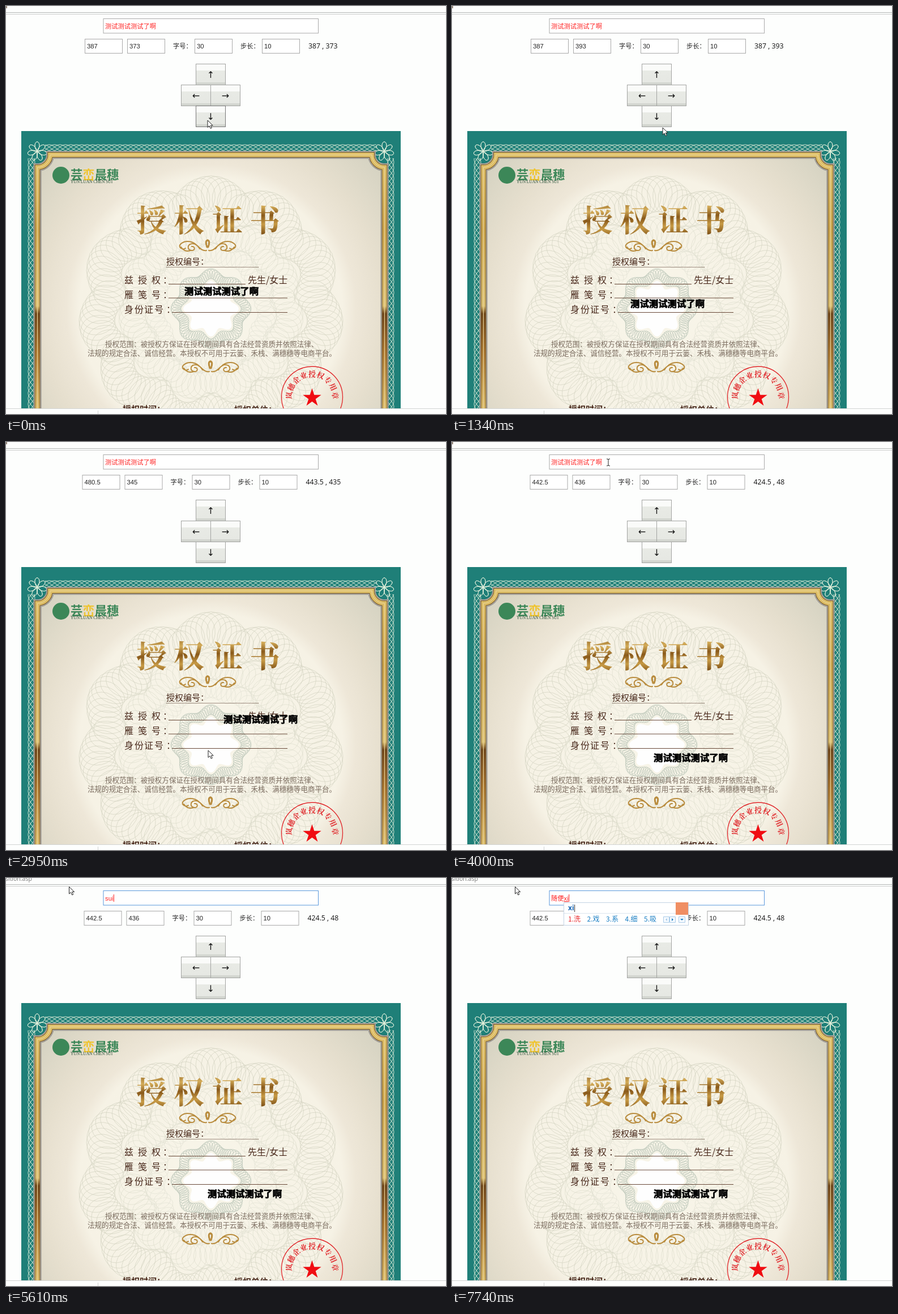
Animation of 777x721 px, one loop 7.99 s. Source, as an HTML page:

```html
<!DOCTYPE html>
<html lang="zh">
<head>
<meta charset="utf-8">
<title>Certificate text positioning</title>
<style>
html, body { margin: 0; width: 100%; height: 100%; overflow: hidden; background: #fdfefd; }
svg { display: block; width: 777px; height: 721px; font-family: "Noto Sans CJK SC", "Noto Sans CJK", "Noto Sans", sans-serif; }
text { white-space: pre; }
.num { font: 11.25px "Liberation Sans", Arial, sans-serif; fill: #222; }
.label { font-size: 11.25px; fill: #222; }
.pos { font: 12.3px "Open Sans", "Noto Sans", sans-serif; fill: #111; }
.box { fill: #fff; stroke: #a9a9a9; }
.arrow { font: 16px "DejaVu Sans", sans-serif; text-anchor: middle; fill: #111; }
.form { font-size: 16px; fill: #49291c; }
.para { font-size: 12.55px; fill: #7c6d60; }
.typed { font: 11.25px "Liberation Sans", "Noto Sans CJK SC", sans-serif; fill: #f22; }
.stamp { font-size: 16.4px; font-weight: 900; stroke: #000; stroke-width: .7; }
.title { font: 900 54px "Noto Serif CJK SC", "Noto Sans CJK SC", serif; }
.seal { font: bold 13px "Noto Serif CJK SC", "Noto Sans CJK SC", serif; text-anchor: middle; fill: #e0262a; }
.words { font: 12px "Noto Sans CJK SC", sans-serif; fill: #1b7fc4; }
.line { fill: none; }
</style>
</head>
<body>
<svg viewBox="0 0 777 721">
  <defs>
    <clipPath id="view"><rect x="27" y="221" width="670" height="490"/></clipPath>
    <radialGradient id="paper" gradientUnits="userSpaceOnUse" cx="362" cy="535" r="400">
      <stop offset="0" stop-color="#f8f5e9"/><stop offset=".58" stop-color="#f6f2e5"/>
      <stop offset=".64" stop-color="#eee7d8"/><stop offset=".76" stop-color="#e6dfce"/>
      <stop offset="1" stop-color="#d3d1c0"/>
    </radialGradient>
    <linearGradient id="frame" gradientUnits="userSpaceOnUse" x1="0" y1="259" x2="0" y2="711">
      <stop offset="0" stop-color="#dfc06a"/><stop offset=".3" stop-color="#c9a24a"/>
      <stop offset=".6" stop-color="#d9bd70"/><stop offset=".63" stop-color="#70461a"/>
      <stop offset=".78" stop-color="#a8752f"/><stop offset="1" stop-color="#d8b867"/>
    </linearGradient>
    <linearGradient id="gold" x1="0" y1="0" x2=".15" y2="1">
      <stop offset=".1" stop-color="#8f6222"/><stop offset=".35" stop-color="#d3ab58"/>
      <stop offset=".55" stop-color="#8a5a1b"/><stop offset=".75" stop-color="#c79a45"/>
      <stop offset="1" stop-color="#764912"/>
    </linearGradient>
    <linearGradient id="banded" x2="0" y2="1">
      <stop offset=".32" stop-color="#fafbf9"/><stop offset=".32" stop-color="#e8eae5"/>
      <stop offset=".88" stop-color="#e6e8e3"/><stop offset=".88" stop-color="#d2d5cf"/>
    </linearGradient>
    <linearGradient id="smooth" x2="0" y2="1">
      <stop offset="0" stop-color="#f6f6f6"/><stop offset="1" stop-color="#dcdcdc"/>
    </linearGradient>
    <g id="curl" class="line" stroke="#b98c3e" stroke-width="2" stroke-linecap="round">
      <path d="M2 8C14 10 16-4 26-4S37 7 29 8S22 0 28 1M14 5C24-11 40-10 47-4S44 8 39 4M30 8C38 11 44 7 47 2"/>
      <path d="M1 2Q5-9 0-10" stroke-width="3"/>
    </g>
  </defs>

  <rect width="777" height="721" fill="#fdfefd"/>
  <path d="M0 11.5H777" stroke="#b3b5b4"/><path d="M0 14.5H777" stroke="#cbcdcc"/>
  <rect id="speck" width="2" height="4" fill="#9a8c80"/>
  <text id="address" x="-1" y="5" font-size="10.5" fill="#777" font-family="Open Sans, sans-serif">sition.asp</text>

  <rect id="field" class="box" x="172" y="22.5" width="379.5" height="25.5"/>
  <text class="typed" x="175" y="40"><tspan id="typed"></tspan><tspan id="composing" text-decoration="underline"></tspan></text>
  <rect id="caret" y="29" width="1" height="13" fill="#f22"/>

  <g id="row">
    <text class="label" x="295" y="75">字号：</text><text class="label" x="414" y="75">步长：</text>
    <text id="pos" class="pos" x="534" y="75"></text>
  </g>
  <g id="pad"></g>

  <g clip-path="url(#view)">
    <rect x="27" y="221" width="670" height="490" fill="#1f7f78"/>
    <g id="lace" class="line" stroke="#e3f0dc" stroke-width=".9"></g>
    <path id="inside" fill="url(#paper)"/>
    <g id="edges" class="line"></g>
    <g id="rosettes" class="line" stroke-width=".65"></g>

    <circle cx="97" cy="299" r="15" fill="#3c8758"/>
    <text x="114" y="306" font-size="21.3" font-weight="700" fill="#3c8758">芸<tspan fill="#efc42f">峦</tspan>晨穗</text>
    <text x="114" y="313" font-size="7.4" font-family="Liberation Serif, serif" fill="#264d36">YUN LUAN CHEN SUI</text>

    <text class="title" x="230 296 364 430" y="399" fill="url(#gold)">授权证书</text>
    <g id="curls"></g>
    <g class="form">
      <text x="283" y="456.500" font-size="15" font-weight="500">授权编号：</text>
      <text x="209 233 257 277" y="490">兹授权：</text><text x="427" y="490">先生/女士</text>
      <text x="209 233 257 277" y="516">雁笺号：</text>
      <text x="209 227 244 262 283" y="541.500">身份证号：</text>
    </g>
    <path d="M283 461.500H446" stroke="#49291c" stroke-dasharray="1 1"/>
    <path d="M287 491.500H423M287 516H497M293 541.500H497" stroke="#6a4a3a"/>
    <text class="para" x="175" y="602">授权范围：被授权方保证在授权期间具有合法经营资质并依照法律、</text>
    <text class="para" x="144" y="618">法规的规定合法、诚信经营。本授权不可用于云篓、禾栈、满穗穗等电商平台。</text>
    <g font-size="15" font-weight="600" fill="#49291c"><text x="206" y="718">授权时间：</text><text x="403" y="719">授权单位：</text></g>
    <g id="seal">
      <circle class="line" cx="540.500" cy="691" r="54" stroke="#e0262a" stroke-width="1.300"/>
      <path id="star" fill="#f00d12"/>
    </g>
    <text id="stamp" class="stamp">测试测试测试了啊</text>
  </g>
  <path d="M0 711.500H777" stroke="#d2d4d3"/><path d="M162.500 715V721" stroke="#d2d4d3"/>

  <g id="popup">
    <rect x=".5" y="43.500" width="220" height="40" fill="#fff" stroke="#c3d3e4"/>
    <path d="M1 62.500H220" stroke="#dce5ee"/>
    <text id="spell" x="8" y="57" font-size="12" font-weight="700" fill="#1565b5" font-family="Open Sans, sans-serif"></text>
    <rect id="spellCaret" y="47" width="1" height="13" fill="#333"/>
    <g id="words"></g>
    <path d="M176.500 68.500h10v10h-10zM187.500 68.500h10v10h-10zM203.500 68.500h11v10h-11z" fill="#f5faff" stroke="#a9cbe8"/>
    <path d="M183 71v5l-3-2.500z" fill="#a9cbe8"/><path d="M191 71v5l3-2.500zM206 72h6l-3 3z" fill="#1b7fc4"/>
    <rect x="198" y="43" width="22" height="22" fill="#f08e63"/>
  </g>
  <path id="arrow" d="M0 0V12.500L3 9.800L5.200 14.500L7.300 13.500L5.200 9.100H9.200Z" fill="#fff" stroke="#222"/>
  <path id="beam" class="line" d="M-3-6H-1L0-5L1-6H3M0-5V5M-3 6H-1L0 5L1 6H3" stroke="#222"/>
</svg>
<script>
const $ = id => document.getElementById(id);
const TAU = Math.PI * 2;

function add(parent, tag, attrs, text = '') {
  const node = document.createElementNS('http://www.w3.org/2000/svg', tag);
  for (const key in attrs) node.setAttribute(key, attrs[key]);
  node.textContent = text;
  return $(parent).appendChild(node);
}

function trace(count, point) {
  let d = '';
  for (let i = 0; i <= count; i++) d += (i ? 'L' : 'M') + point(i / count).map(v => v.toFixed(1));
  return d;
}

// Angle is measured clockwise from the top.
const polar = (cx, cy, r, a) => [cx + r * Math.sin(a), cy - r * Math.cos(a)];

function guilloche(loops, middle, depth, skew, stroke) {
  const d = trace(loops * 22, u => {
    const a = u * TAU, turn = loops * a;
    return polar(362, 535, middle(a) + depth * Math.cos(turn), a + skew * Math.sin(turn));
  });
  add('rosettes', 'path', { d, stroke });
}

function drawCertificate() {
  const wave = (length, phase) => trace(length / 3, u => [u * length, 6 * Math.sin(u * length / 48 * TAU + phase)]);
  for (let k = 0; k < 5; k++) {
    const phase = k * TAU / 5;
    add('lace', 'path', { d: wave(585, phase), transform: 'translate(69 251)' });
    for (const x of [45, 679]) add('lace', 'path', { d: wave(450, phase), transform: `translate(${x} 269) rotate(90)` });
  }
  for (const x of [55, 668]) {
    add('lace', 'path', { d: trace(260, u => polar(x, 257, 17 * Math.cos(u * TAU * 7), u * TAU * 3)) });
  }

  const outline = 'M55.500 721V285A22 22 0 0 0 78 263H646A22 22 0 0 0 668.500 285V721';
  $('inside').setAttribute('d', outline + 'Z');
  const strokes = [['#8f8b88', 14], ['#d8d2c4', 11.5], ['#5d4320', 10], ['url(#frame)', 8], ['#f0dda0', 1]];
  for (const [stroke, width] of strokes) add('edges', 'path', { d: outline, stroke, 'stroke-width': width });

  const petals = a => Math.abs(Math.cos(5.5 * a));
  guilloche(132, a => 177 + 26 * petals(a), 32, .12, '#cfcfbd');
  guilloche(88, a => 126 + 14 * petals(a), 24, .14, '#dcdccb');
  guilloche(66, a => 92 + 8 * petals(a), 17, .16, '#e0e0d2');
  guilloche(96, a => 57 + 5 * Math.cos(8 * a), 9, .1, '#aebbae');
  add('rosettes', 'path', { fill: '#fefefe', d: trace(160, u => polar(362, 535, 43 + 6 * Math.cos(8 * u * TAU), u * TAU)) });

  for (const [x, y] of [[356, 424], [361, 638]]) {
    for (const side of [1, -1]) add('curls', 'use', { href: '#curl', transform: `translate(${x} ${y}) scale(${side} 1)` });
  }

  [...'岚穗企业授权专用章'].forEach((char, i) =>
    add('seal', 'text', { class: 'seal', x: 540.5, y: 655, transform: `rotate(${-86 + 21.5 * i} 540.5 691)` }, char));
  $('star').setAttribute('d', trace(10, u => polar(540.5, 692.5, (u * 10 + .5 | 0) % 2 ? 6.5 : 17, u * TAU)) + 'Z');
}

function drawControls() {
  const values = [[139, ''], [214, ''], [333, '30'], [452, '10']];
  values.forEach(([x, value], i) => {
    add('row', 'rect', { class: 'box', x: x + .5, y: 58.5, width: 66, height: 25 });
    add('row', 'text', { class: 'num', id: 'value' + i, x: x + 4, y: 75 }, value);
  });
  const keys = [[336, 102, '↑'], [310, 139, '←'], [362, 139, '→'], [336, 176, '↓']];
  for (const [x, y, sign] of keys) {
    add('pad', 'rect', { class: 'key', x: x - .5, y: y + .5, width: 52, height: 37, stroke: '#a3a4a2' });
    add('pad', 'text', { class: 'arrow', x: x + 25.5, y: y + 25 }, sign);
  }
}

// Each entry changes only the listed properties of the state before it.
const steps = [
  [0, { x: '387', y: '373', pos: '387 , 373', shift: 0, stamp: [315, 510], arrow: [356, 202], beam: null,
        text: '测试测试测试了啊', compose: '', focus: false, caret: false, popup: null, address: false, smooth: false, hover: true }],
  [250, { stamp: [315, 517.5] }],
  [530, { y: '383', pos: '387 , 383', stamp: [315, 525] }],
  [810, { y: '393', pos: '387 , 393', smooth: true }],
  [1090, { stamp: [315, 532], arrow: [358, 206] }],
  [1340, { arrow: [372, 215], smooth: false, hover: false }],
  [1610, { arrow: [388, 330], pos: '485.5 , 146', shift: -4.5 }],
  [1860, { arrow: [391, 506], pos: '489.5 , 383' }],
  [2140, { arrow: [384, 485], x: '480.5', y: '345', pos: '479.5 , 354' }],
  [2390, { arrow: [387, 525], pos: '484.5 , 408', stamp: [384, 496] }],
  [2670, { arrow: [384, 556], pos: '480.5 , 450' }],
  [2950, { arrow: [357, 545], pos: '443.5 , 435' }],
  [3230, { x: '442.5', y: '436', pos: '442.5 , 436' }],
  [3500, { arrow: [343, 257], pos: '424.5 , 48', shift: -1.5, stamp: [356, 564] }],
  [3750, { arrow: [310, 120] }],
  [4000, { arrow: null, beam: [276, 36] }],
  [4250, { beam: null, text: '测试测试测试', focus: true, caret: true }],
  [4520, { arrow: [111.5, 15.5], text: '' }],
  [5610, { text: 'sui', address: true }],
  [5890, { text: 'suibi' }],
  [6170, { text: '' }],
  [6420, { text: 'suib' }],
  [6690, { text: 'sui' }],
  [6940, { text: '' }],
  [7210, { text: '随', compose: 'bian', popup: [187, '便边变遍编'] }],
  [7460, { text: '随便', compose: '', popup: null }],
  [7740, { compose: 'xi', popup: [197, '洗戏系细吸'] }],
];

const show = (id, visible) => $(id).style.display = visible ? '' : 'none';
function place(id, point) {
  show(id, point);
  if (point) $(id).setAttribute('transform', `translate(${point})`);
}

function render(s) {
  $('value0').textContent = s.x;
  $('value1').textContent = s.y;
  $('pos').textContent = s.pos;
  place('row', [s.shift, 0]);
  place('stamp', s.stamp);
  place('arrow', s.arrow);
  place('beam', s.beam);
  show('address', s.address);
  show('speck', !s.address);
  $('field').style.stroke = s.focus ? '#5b98dc' : '#a9a9a9';
  document.querySelectorAll('.key').forEach((key, i) => {
    key.style.fill = `url(#${s.smooth ? 'smooth' : 'banded'})`;
    key.style.stroke = s.hover && i === 3 ? '#777' : '#a3a4a2';
  });

  $('typed').textContent = s.text;
  $('composing').textContent = s.compose;
  show('caret', s.caret);
  $('caret').setAttribute('x', 175.5 + $('typed').parentNode.getComputedTextLength());

  place('popup', s.popup && [s.popup[0], 0]);
  if (s.popup) {
    $('spell').textContent = s.compose;
    $('spellCaret').setAttribute('x', 8.5 + $('spell').getComputedTextLength());
    $('words').textContent = '';
    [...s.popup[1]].forEach((word, i) =>
      add('words', 'text', { class: 'words', x: 8 + 33.5 * i, y: 77, style: i ? '' : 'fill:#e8282c' }, `${i + 1}.${word}`));
  }
}

let current = -1;
function tick() {
  const time = performance.now() % 7990;
  const index = steps.filter(([start]) => start <= time).length - 1;
  if (index !== current) {
    current = index;
    render(Object.assign({}, ...steps.slice(0, index + 1).map(step => step[1])));
  }
  requestAnimationFrame(tick);
}

drawCertificate();
drawControls();
tick();
</script>
</body>
</html>
```
